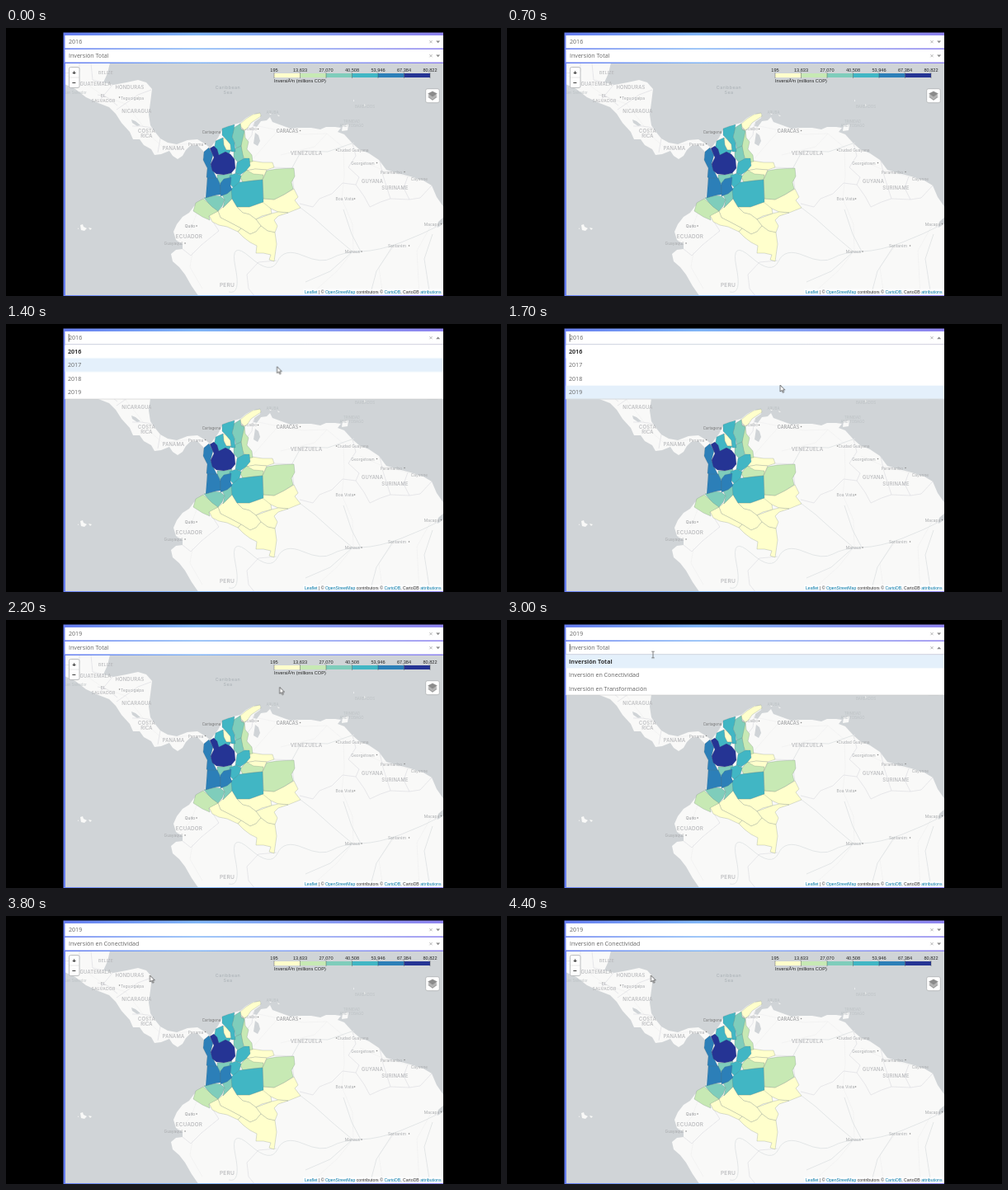
Recreate the animation shown at these times as an HTML page. Size 600 by 325 pixels, loop 8 s.

```html
<!DOCTYPE html>
<html lang="es">
<head>
<meta charset="utf-8">
<title>Mapa de inversión</title>
<style>
html, body { margin: 0; width: 100%; height: 100%; overflow: hidden; background: #000; }
svg { display: block; width: 100%; height: 100%; }
text { white-space: pre; }

.land { fill: #f9f9f8; }
.water { fill: #d0d4d7; }
.borders { fill: none; stroke: #dedee2; stroke-width: .7; }
.roads { fill: none; stroke: #eeeeee; stroke-width: .6; }
.rivers { fill: none; stroke: #dde1e3; stroke-width: .8; }

.labels { font-family: Inter, sans-serif; text-anchor: middle; fill: #a9abae; }
.country { font-size: 5.8px; font-weight: 500; letter-spacing: .2px; fill: #b6b7ba; }
.city { font-size: 4.9px; }
.sea { font-size: 5.4px; letter-spacing: .45px; fill: #a8afb4; }
.faint { font-size: 4.4px; fill: #bcc1c4; }

.regions { stroke: #566; stroke-opacity: .55; stroke-width: .4; stroke-linejoin: round; }
.q1 { fill: #ffffcc; } .q2 { fill: #c7e9b4; } .q3 { fill: #7fcdbb; }
.q4 { fill: #41b6c4; } .q5 { fill: #2c7fb8; } .q6 { fill: #253494; }

.legend { font: 5.6px "Liberation Sans", Arial, sans-serif; fill: #222; }
.ticks { text-anchor: middle; }
.credit { font: 5.17px "Liberation Sans", Arial, sans-serif; fill: #333; }
.credit tspan { fill: #0078a8; }
.zoom { font: bold 8px "Liberation Sans", Arial, sans-serif; text-anchor: middle; fill: #222; }

.ui { font: 7.1px "Open Sans", sans-serif; fill: #666; }
.ui .chosen { font-weight: 700; fill: #333; }
.hover { fill: #e4f0fb; }
.caret { stroke: #333; stroke-width: .7; }
.edge { stroke: #ccc; stroke-width: .6; }
.mark { fill: none; stroke: #999; stroke-width: .7; }
.arrow { fill: #888; }

.timed { animation: 8s step-end infinite; }
.year-old { animation-name: yearOld; }
.year-new { animation-name: yearNew; }
.kind-old { animation-name: kindOld; }
.kind-new { animation-name: kindNew; }
.year-menu { animation-name: yearMenu; }
.kind-menu { animation-name: kindMenu; }
.year-hover { animation-name: yearHover; }
.kind-hover { animation-name: kindHover; }
.pointer { animation-name: pointer; }
.beam { animation-name: beam; }
.mouse { animation: mouse 8s linear infinite; }

@keyframes yearOld { 0% { opacity: 1 } 25%, 100% { opacity: 0 } }
@keyframes yearNew { 0% { opacity: 0 } 25%, 100% { opacity: 1 } }
@keyframes kindOld { 0% { opacity: 1 } 46.25%, 100% { opacity: 0 } }
@keyframes kindNew { 0% { opacity: 0 } 46.25%, 100% { opacity: 1 } }
@keyframes yearMenu { 0% { opacity: 0 } 13.75% { opacity: 1 } 25%, 100% { opacity: 0 } }
@keyframes kindMenu { 0% { opacity: 0 } 35% { opacity: 1 } 46.25%, 100% { opacity: 0 } }
@keyframes yearHover {
  0% { transform: none }
  16.25% { transform: translateY(16.6px) }
  18.75% { transform: translateY(33.2px) }
  21.25%, 100% { transform: translateY(49.8px) }
}
@keyframes kindHover { 0% { transform: none } 41.25%, 100% { transform: translateY(16.6px) } }
@keyframes pointer {
  0% { opacity: 0 } 15% { opacity: 1 } 32.5% { opacity: 0 } 40%, 100% { opacity: 1 }
}
@keyframes beam {
  0% { opacity: 0 } 11.25% { opacity: 1 } 15% { opacity: 0 } 32.5% { opacity: 1 } 40%, 100% { opacity: 0 }
}
@keyframes mouse {
  0%, 11.25% { transform: translate(322px, 16px) }
  13.75% { transform: translate(326px, 18px) }
  17.5% { transform: translate(328.5px, 51.5px) }
  22.5%, 27.5% { transform: translate(332px, 81.5px) }
  33.75% { transform: translate(184px, 34px) }
  37.5% { transform: translate(177px, 42px) }
  42.5%, 100% { transform: translate(174.5px, 72px) }
}
</style>
</head>
<body>
<svg viewBox="0 0 600 325" preserveAspectRatio="none">
<defs>
  <linearGradient id="frame" x1="0" x2="1" y1="0" y2="0">
    <stop offset="0" stop-color="#667df0"/><stop offset=".35" stop-color="#80b5f6"/><stop offset="1" stop-color="#8e83ee"/>
  </linearGradient>
  <clipPath id="map"><rect x="72" y="43" width="458" height="281"/></clipPath>
  <g id="controls">
    <path class="mark" d="M513.4 -1.6l3.2 3.2m0 -3.2l-3.2 3.2"/>
  </g>
</defs>

<rect width="600" height="325"/>
<rect x="69.5" y="5.5" width="460.5" height="319.5" fill="url(#frame)"/>

<g clip-path="url(#map)">
  <rect class="water" x="71" y="43" width="460" height="283"/>
  <path class="land" d="M71 42H126L123 55 118 66 130 69 146 66 160 63 170 66 177 74 175 90 173 105 175 118 179 124 187 134 196 139 207 141 220 136 232 135 242 141 248 146 248 156 243 157 239 149 232 142 223 143 218 148 214 155 208 159 202 155 198 149 188 153 180 154 176 147 167 142 162 135 154 135 150 126 140 115 133 104 125 96 112 91 97 84 84 74 71 68Z"/>
  <path class="land" d="M248 145L257 133 263 122 272 118 284 115 291 109 300 104 309 104 308 109 301 114 300 119 304 120 309 113 316 112 320 108 323 114 334 118 345 122 355 121 370 121 381 123 388 120 399 120 406 121 402 126 410 129 420 140 428 147 440 152 452 160 461 172 475 176 490 180 506 185 516 191 522 205 531 218V326H234L225 313 217 299 210 290 202 283 200 274 206 269 214 268 214 262 206 257 203 247 207 238 214 229 222 224 228 216 241 206 243 192 245 178 243 165 239 157 243 149Z"/>
  <path class="land" d="M408 118l7-1 -1 7 -7 1ZM90 239l3-1 1 3 4 2 -3 3 -4-1ZM100 242l4 1 -2 2ZM319 103l3 2 -2 0ZM329 105l3 2 -2 0ZM434 92l2 2 -1 2ZM421 86l1 3 -1 0ZM87 242l1 2 -1 0Z"/>
  <path class="water" d="M302 127l4 3 2 7 -3 6 -5-3ZM152 111l5 2 6 5 -4 1 -6-4ZM524 235l7-6v8l-8 5Z"/>
  <path class="roads" d="M71 57L95 66 119 83 145 92 160 111 175 131 190 144 224 140M306 119L330 124 360 129 389 128 409 145 410 180 407 207 420 238 421 270M330 124L314 142 300 158M389 128L374 144 333 154M429 160L456 172 490 181M208 260L224 244 231 225M226 272L223 290 238 316M421 270L402 294 373 320M470 265L452 290 457 325M516 238L498 270 501 325"/>
  <path class="rivers" d="M530 237Q505 250 479 260T430 271 395 279 360 276 329 283 296 278 278 290 270 320M421 272L395 250 374 231 357 218M422 139L390 150 358 149 346 171 349 196M430 271L419 250 409 220M420 271L393 295 363 308M469 264L449 295 441 325M517 250L507 280 514 325"/>
  <path class="borders" d="M71 55L89 53 89 43M103 43L105 63 118 66M112 90L120 80 129 69M111 81L121 83 135 94M134 99L147 90 160 81 176 75M153 119L164 119 177 121M187 134L184 151M420 140L424 155 415 169 428 181 424 190 434 204 441 217 454 211 466 207 489 208 502 206 516 191M453 161L457 179 466 207M487 180L482 194 489 208M356 213L372 217 380 207 395 201 408 188 424 190M214 268L224 276 237 263 258 246 247 229 228 220M328 282L306 284 292 299 294 316 302 326M300 116L298 130 291 139M297 165L325 169 348 170"/>

  <g class="labels">
    <g class="country">
      <text x="121" y="56" style="font-size:5px">BELIZE</text>
      <text x="108.500" y="69.500">GUATEMALA</text>
      <text x="150" y="74">HONDURAS</text>
      <text x="118" y="84" style="font-size:5.200px">EL</text>
      <text x="118" y="90" style="font-size:5.200px">SALVADOR</text>
      <text x="158.500" y="103">NICARAGUA</text>
      <text x="170.500" y="126.500">COSTA</text>
      <text x="170.500" y="132.500">RICA</text>
      <text x="203" y="147.500">PANAMA</text>
      <text x="364" y="153.500" style="font-size:6.200px">VENEZUELA</text>
      <text x="444" y="187.500">GUYANA</text>
      <text x="471.500" y="195.500">SURINAME</text>
      <text x="222" y="254.500" style="font-size:6.300px">ECUADOR</text>
      <text x="268" y="314" style="font-size:6.600px">PERU</text>
    </g>
    <g class="city">
      <text x="153" y="86.500">Tegucigalpa</text>
      <text x="341" y="126.500" style="font-size:5.600px;fill:#8d8f92">CARACAS</text>
      <text x="420.500" y="150">Ciudad Guayana</text>
      <text x="432.500" y="165.500">Georgetown</text>
      <text x="467" y="176.500">Paramaribo</text>
      <text x="501" y="184.500">Cayenne</text>
      <text x="410.500" y="208.500">Boa Vista</text>
      <text x="516" y="239.500">Macapá</text>
      <text x="420" y="273">Manaus</text>
      <text x="474" y="265.500">Santarém</text>
      <text x="223" y="242" style="fill:#8d8f92">Quito</text>
      <text x="203" y="263">Guayaquil</text>
      <text x="230" y="142.500">Panama</text>
      <text x="292" y="124">Maracaibo</text>
      <text x="249" y="127.500" style="font-size:4.600px;fill:#777">Cartagena</text>
    </g>
    <g class="sea"><text x="269" y="74">Caribbean</text><text x="269" y="80">Sea</text></g>
    <g class="faint">
      <text x="323" y="104">ARUBA</text>
      <text x="435" y="97">BARBADOS</text>
      <text x="419" y="115">TRINIDAD</text>
      <text x="419" y="120">AND TOBAGO</text>
      <text x="84" y="80">San Salvador</text>
    </g>
    <path d="M137.500 84h.1M356.500 124.500h.1M400.500 148h.1M449.500 163.500h.1M483 174.500h.1M422.500 207h.1M527.500 237.500h.1M431 271h.1M488.500 264h.1M231 240h.1M217 261h.1M241.500 140.500h.1M305.500 122.500h.1" stroke="#888" stroke-width="1.5" stroke-linecap="round"/>
  </g>

  <g class="regions">
    <g class="q1">
      <path d="M284 116L291 110 299 105 308 103 309 107 303 111 297 115 293 121 289 124 285 120Z"/>
      <path d="M263 133L267 135 272 141 273 148 267 148 264 142Z"/>
      <path d="M289 165L298 161 311 163 323 163 325 169 316 172 302 171 291 173Z"/>
      <path d="M291 173L302 171 316 172 311 184 300 185 287 187 284 181Z"/>
      <path d="M312 207L325 208 337 202 349 195 354 205 350 209 357 218 352 220 342 224 330 223 321 219 308 212Z"/>
      <path d="M280 217L295 217 311 211 321 219 322 225 310 228 303 232 295 226 287 224Z"/>
      <path d="M322 225L330 223 342 224 330 228 325 233 329 240 326 248 317 246 309 240 303 232Z"/>
      <path d="M257 222L268 213 274 207 280 217 287 224 295 226 303 232 309 240 303 247 296 250 285 243 270 235 260 230Z"/>
      <path d="M246 227L257 222 260 230 270 235 285 243 281 247 268 241 258 239 250 235Z"/>
      <path d="M285 243L296 250 303 247 309 240 317 246 326 248 328 262 325 283 319 281 321 275 312 273 303 273 304 264 296 260 288 254 281 247Z"/>
    </g>
    <g class="q2">
      <path d="M285 123L289 124 290 133 294 138 292 147 298 154 299 162 292 163 286 153 285 141Z"/>
      <path d="M284 181L291 172 300 177 312 178 311 184 300 185 287 187Z"/>
      <path d="M311 184L316 173 328 171 349 170 350 180 346 187 348 195 337 202 325 208 312 207Z"/>
      <path d="M230 212L239 207 245 212 252 218 257 222 246 228 247 233 238 229 227 222Z"/>
    </g>
    <g class="q3">
      <path d="M276 121L284 116 285 123 289 125 287 134 285 143 279 147 277 139 274 132Z"/>
      <path d="M276 147L285 143 287 153 289 161 281 163 276 157Z"/>
      <path d="M256 178L264 178 274 176 273 183 264 185 261 190 256 186Z"/>
      <path d="M240 206L253 203 260 204 265 208 262 216 257 222 250 217 245 212Z"/>
      <path d="M262 203L270 197 275 195 274 207 268 213 263 218 265 208Z"/>
    </g>
    <g class="q4">
      <path d="M262 122L270 119 277 117 276 124 274 132 277 139 278 150 273 150 272 141 266 134 262 130Z"/>
      <path d="M254 137L263 133 264 142 267 148 273 148 270 153 258 154 252 148Z"/>
      <path d="M280 163L289 158 295 158 296 167 291 173 284 178 278 176 279 169Z"/>
      <path d="M271 179L279 176 285 179 283 187 276 194 271 189Z"/>
      <path d="M273 195L283 187 300 185 311 184 312 211 295 217 280 217 274 207Z"/>
    </g>
    <g class="q5">
      <path d="M240 150L246 145 251 154 248 165 253 177 256 183 248 185 243 181 244 170 239 160Z"/>
      <path d="M244 182L256 182 260 190 260 202 253 203 242 206 243 194Z"/>
      <path d="M260 188L264 183 273 181 272 191 274 196 268 201 260 204Z"/>
    </g>
    <path class="q6" d="M247 146L252 143 256 147 258 154 266 150 272 153 277 159 278 170 273 176 264 178 255 177 250 173 248 165 252 157Z"/>
  </g>

  <g class="legend">
    <g class="ticks">
      <text x="325" y="53">195</text><text x="356.500" y="53">13,633</text><text x="388" y="53">27,070</text><text x="419.500" y="53">40,508</text><text x="451" y="53">53,946</text><text x="482.500" y="53">67,384</text><text x="514" y="53">80,822</text>
    </g>
    <path class="q1" d="M325 55h31.500v5h-31.500Z"/><path class="q2" d="M356.500 55h31.500v5h-31.500Z"/>
    <path class="q3" d="M388 55h31.500v5h-31.500Z"/><path class="q4" d="M419.500 55h31.500v5h-31.500Z"/>
    <path class="q5" d="M451 55h31.500v5h-31.500Z"/><path class="q6" d="M482.500 55h31.500v5h-31.500Z"/>
    <path d="M325 54v7M356.500 54v7M388 54v7M419.500 54v7M451 54v7M482.500 54v7M514 54v7" stroke="#444" stroke-width=".4"/>
    <text x="325" y="65.500">InversiÃ³n (millions COP)</text>
  </g>

  <g stroke="#b4b6b8" stroke-width=".9">
    <rect x="76.500" y="47.500" width="12.500" height="25" rx="2" fill="#fff"/>
    <path d="M77 60h11.500" stroke="#ccc" stroke-width=".5"/>
    <rect x="508.700" y="73.700" width="16.600" height="17" rx="2.200" fill="#fff"/>
  </g>
  <g class="zoom"><text x="82.700" y="56.700">+</text><text x="82.700" y="68.700">−</text></g>
  <g stroke="#fff" stroke-width=".3">
    <path d="M511 83.500l6-2.500 6 2.500 -6 4.500Z" fill="#999"/>
    <path d="M511 81.500l6-2.500 6 2.500 -6 4.500Z" fill="#aaa"/>
    <path d="M511 79.500l6-3 6 3 -6 4.500Z" fill="#8b8b8b"/>
  </g>

  <rect x="360" y="316.500" width="170" height="8" fill="#fff" opacity=".7"/>
  <text class="credit" x="362" y="322"><tspan>Leaflet</tspan> | © <tspan>OpenStreetMap</tspan> contributors © <tspan>CartoDB</tspan>, CartoDB <tspan>attributions</tspan></text>
</g>

<g class="ui">
  <rect x="71.500" y="9" width="458.500" height="15.500" fill="#fff"/>
  <rect x="71.500" y="26" width="458.500" height="15.500" fill="#fff"/>
  <text class="timed year-old" x="76" y="19.300">2016</text>
  <text class="timed year-new" x="76" y="19.300">2019</text>
  <text class="timed kind-old" x="76" y="36.300">Inversión Total</text>
  <text class="timed kind-new" x="76" y="36.300">Inversión en Conectividad</text>
  <use href="#controls" y="16.700"/><use href="#controls" y="33.700"/>
  <path class="arrow" d="M521.200 15.500h5l-2.500 2.700ZM521.200 32.500h5l-2.500 2.700Z"/>

  <g class="timed year-menu">
    <rect x="71.500" y="24.500" width="458.500" height="66.500" fill="#fff"/>
    <rect class="timed year-hover hover" x="71.500" y="24.800" width="458.500" height="16.600"/>
    <path class="edge" d="M71.500 24.700H530M71.500 91H530"/>
    <rect x="520" y="14" width="7" height="6" fill="#fff"/><path class="arrow" d="M521.200 18.200h5l-2.500-2.700Z"/>
    <path class="caret" d="M76.200 12v9.500"/>
    <text class="chosen" x="75" y="35.600">2016</text>
    <text x="75" y="52.200">2017</text>
    <text x="75" y="68.800">2018</text>
    <text x="75" y="85.400">2019</text>
  </g>

  <g class="timed kind-menu">
    <rect x="71.500" y="41.500" width="458.500" height="49.500" fill="#fff"/>
    <rect class="timed kind-hover hover" x="71.500" y="41.800" width="458.500" height="16.600"/>
    <path class="edge" d="M71.500 41.700H530M71.500 91H530"/>
    <rect x="520" y="31" width="7" height="6" fill="#fff"/><path class="arrow" d="M521.200 35.200h5l-2.500-2.700Z"/>
    <path class="caret" d="M76.200 29v9.500"/>
    <text class="chosen" x="75" y="52.700">Inversión Total</text>
    <text x="75" y="69.300">Inversión en Conectividad</text>
    <text x="75" y="85.900">Inversión en Transformación</text>
  </g>
</g>

<g class="mouse">
  <path class="timed pointer" d="M0 0V8L1.900 6.300 3.200 9.200 4.500 8.600 3.200 5.900H5.700Z" fill="#fff" stroke="#333" stroke-width=".7"/>
  <path class="timed beam" d="M-1.800 -3.800H1.800M0 -3.800V3.800M-1.800 3.800H1.800" fill="none" stroke="#555" stroke-width=".7"/>
</g>
</svg>
</body>
</html>
```
